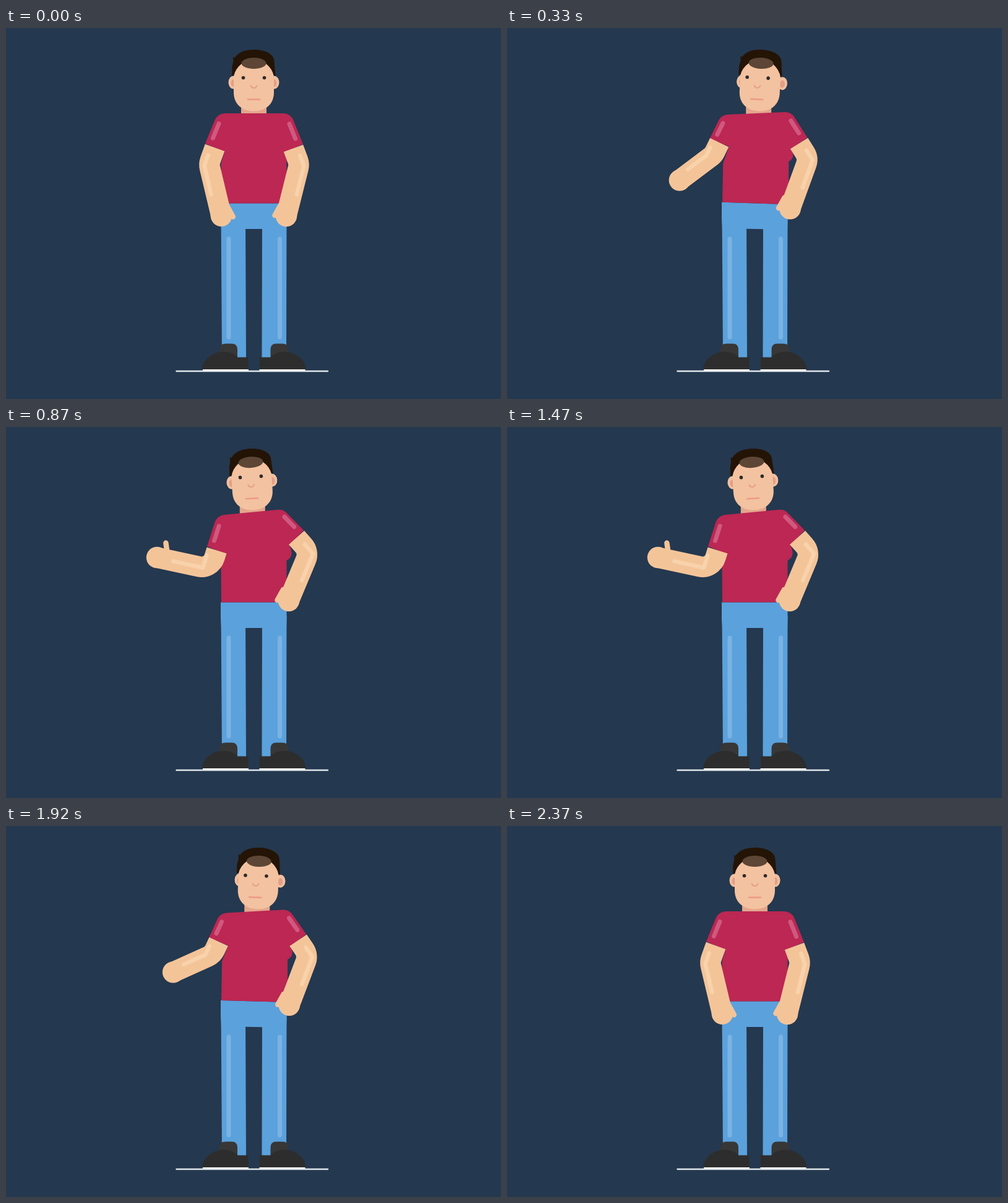
Animation, 800 px wide and 600 px high, one loop 2.4 s. Source, as an HTML page with a canvas:

```html
<!DOCTYPE html>
<html lang="en">
<head>
<meta charset="utf-8">
<title>Man raising his arm</title>
<style>
html, body { margin: 0; height: 100%; overflow: hidden; background: #24384f; }
canvas { display: block; }
</style>
</head>
<body>
<canvas id="stage" width="800" height="600"></canvas>
<script>
const ctx = document.getElementById('stage').getContext('2d');
const SKIN = '#f4c499', SHIRT = '#bc2753', JEANS = '#5ba1dc';
const LOOP = 2400, STEP = 30, TURN = 1140, CENTER = 400.5;

const clamp = u => Math.min(1, Math.max(0, u));
const lerp = (a, b, u) => a + (b - a) * u;
const mix = (a, b, u) => [lerp(a[0], b[0], u), lerp(a[1], b[1], u)];
const add = (a, x, y) => [a[0] + x, a[1] + y];
const polar = (angle, along, across) => [
  Math.cos(angle) * along - Math.sin(angle) * across,
  Math.sin(angle) * along + Math.cos(angle) * across
];

// Smooth 0 to 1 between two times
function smooth(t, from, to) {
  const u = clamp((t - from) / (to - from));
  return u * u * (3 - 2 * u);
}

// How far the arm is up: fast start, slight overshoot, settle
const raiseAt = t =>
  1.02 * Math.sin(clamp((t - 210) / 360) * Math.PI / 2) - .02 * smooth(t, 570, 660);

// Sideways sway of the head in pixels: right, then left, then back
const leanAt = t => 10 * smooth(t, 0, 330) - 12.5 * smooth(t, 330, 510) + 2.5 * smooth(t, 510, 660);

function fill(color, path) {
  ctx.fillStyle = color;
  ctx.fill(new Path2D(path));
}
function line(color, width, points) {
  ctx.strokeStyle = color;
  ctx.lineWidth = width;
  ctx.lineCap = ctx.lineJoin = 'round';
  ctx.beginPath();
  points.forEach(p => ctx.lineTo(...p));
  ctx.stroke();
}
function oval(color, x, y, rx, ry = rx) {
  ctx.fillStyle = color;
  ctx.beginPath();
  ctx.ellipse(x, y, rx, ry, 0, 0, 7);
  ctx.fill();
}

function drawShoe() {
  fill('#373737', 'M345 533V520Q345 510.5 355 510.5H365Q374 510.5 374 520V533Z');
  fill('#2d2d2d', 'M317 552C318 536 334 524 351 523.5C361 523.5 370 527 374 532.5H391.5V552Z');
  fill('#f4f4f4', 'M318 552H392V554H318Z');
}

function drawLegs(lean) {
  line('#dfe5ea', 2.5, [[275.5, 555], [520, 555]]);
  fill(JEANS, 'M347.5 305H387L388 533H349Z M414 305H453.5L453 533H413.5Z');
  const d = lean * .17;
  fill(JEANS, `M347 ${283.5 - d}L453.5 ${283.5 + d}V${310 + d}L453 ${325 + d * .6}L348 ${325 - d * .6}L347 ${310 - d}Z`);
  for (const x of [360, 442.5]) line('#7bb3e3', 7, [[x, 341], [x, 500]]);
  drawShoe();
  ctx.save();
  ctx.translate(801.5, 0);
  ctx.scale(-1, 1);
  drawShoe();
  ctx.restore();
}

function drawHead(raise, lean) {
  const offset = lean - 3 * raise;
  const turn = -1.5 * raise - .35 * Math.abs(lean);
  const ears = Math.max(0, lean) * .3;
  fill('#e5a58c', `M${CENTER + offset * .73 - 20.5} 118h41v24h-41Z`);
  ctx.save();
  ctx.translate(CENTER + offset, 90);
  ctx.rotate((.45 * lean - 3.5 * raise) * Math.PI / 180);
  for (const side of [-1, 1]) {
    oval('#f2c0a0', side * 33 + ears, -2, 8, 10.5);
    oval('#e39f88', side * 33 + ears, -1, 4, 6);
  }
  fill('#241406', 'M-35.5 -13L-35 -28L-33 -36L-33.5 -43L-31 -42C-24 -52 -12 -55 0 -55C18 -55 33 -48 33 -36L35 -13Z');
  fill('#f3c2a0', 'M-32.5 -12Q-30 -24 -20 -32H20Q30 -24 32.5 -12V14C32.5 34 18 44.5 0 44.5S-32.5 34 -32.5 14Z');
  oval('#5d4635', 0, -33, 20, 9);
  for (const side of [-1, 1]) oval('#2c2a2b', turn + side * 17, -9.5, 2.8);
  ctx.strokeStyle = '#e59f88';
  ctx.lineWidth = 2;
  ctx.lineCap = 'round';
  ctx.beginPath();
  ctx.arc(turn, 2, 5, .25, Math.PI - .25);
  ctx.stroke();
  line('#eb9a84', 2.5, [[turn - 9.5, 25.5], [turn + 9.5, 25.5]]);
  ctx.restore();
}

function drawShirt(cornerL, cornerR, outL, inL, outR, inR, lean) {
  const d = lean * .17;
  ctx.fillStyle = SHIRT;
  ctx.beginPath();
  ctx.moveTo(...outL);
  ctx.arcTo(...cornerL, ...cornerR, 18);
  ctx.arcTo(...cornerR, ...outR, 18);
  ctx.lineTo(...outR);
  ctx.lineTo(...inR);
  ctx.quadraticCurveTo(inR[0] + 9, 209, 453.5 + d, 216);
  ctx.lineTo(453.5 + d, 283.5 + d);
  ctx.lineTo(348, 283.5 - d);
  ctx.lineTo(347.5 + d, 219);
  ctx.lineTo(...inL);
  ctx.fill();
  for (const [corner, out, side] of [[cornerL, outL, 8], [cornerR, outR, -8]])
    line('#d0587f', 7, [.3, .78].map(u => add(mix(corner, out, u), side, 2)));
}

function drawArm(shoulder, elbow, hand, thumb, side) {
  ctx.strokeStyle = SKIN;
  ctx.lineWidth = 33.5;
  ctx.lineCap = 'butt';
  ctx.beginPath();
  ctx.moveTo(...shoulder);
  ctx.arcTo(...elbow, ...hand, 22);
  ctx.lineTo(...hand);
  ctx.stroke();
  oval(SKIN, ...hand, 17.3);
  line(SKIN, 8.5, [hand, ...thumb.map(p => add(hand, ...p))]);

  const bend = add(mix(elbow, mix(shoulder, hand, .5), .1), 9 * side, 0);
  const toward = (p, u) => add(bend, (p[0] - elbow[0]) * u, (p[1] - elbow[1]) * u);
  line('#f8d2ab', 6.5, [toward(shoulder, .65), bend, toward(hand, .55)]);
}

function draw(now) {
  let t = Math.floor(now % LOOP / STEP) * STEP;
  if (t > TURN) t = Math.max(0, 2 * TURN - t);
  const raise = raiseAt(t), lean = leanAt(t);
  const arch = Math.sin(Math.PI * raise);       // lift halfway through the raise
  const flare = lean * (1 - raise) ** 4;        // elbow pushed out before the raise

  // A joint at rest, its shift when the arm is up, and its share of the sway
  const joint = (x, y, dx, dy, sway = .5) => [x + dx * raise + lean * sway, y + dy * raise];

  const cornerL = joint(342, 138, -1, 5), cornerR = joint(460, 138, -12, -5);
  const outL = add(joint(322, 187, 3, 6), -1.4 * flare, -11 * arch - .6 * flare);
  const inL = add(outL, 31, 13);
  const elbowL = add(joint(328, 220, 3, 10), -1.4 * flare, -20 * arch - .3 * flare);
  const angle = (76.6 + 115.7 * raise + 8 * arch - flare) * Math.PI / 180;
  const handL = add(elbowL, ...polar(angle, 86 + 3 * raise - 19 * arch, 0));
  const thumbL = [
    polar(angle, -16, lerp(-12, 7, raise)),
    polar(angle, lerp(6, -9, raise), lerp(-18, 26, raise))
  ];
  const outR = joint(480, 188, 1, -21), inR = joint(449, 201, 9, -10);
  const elbowR = joint(474, 220, 16, -18), handR = joint(453, 304, 4, -23, .25);

  ctx.fillStyle = '#24384f';
  ctx.fillRect(0, 0, 800, 600);
  drawLegs(lean);
  drawHead(raise, lean);
  drawShirt(cornerL, cornerR, outL, inL, outR, inR, lean);
  drawArm(mix(outL, inL, .5), elbowL, handL, thumbL, -1);
  drawArm(mix(outR, inR, .5), elbowR, handR, [[-9, -18], [-18.5, -1]], 1);
  requestAnimationFrame(draw);
}
requestAnimationFrame(draw);
</script>
</body>
</html>
```
